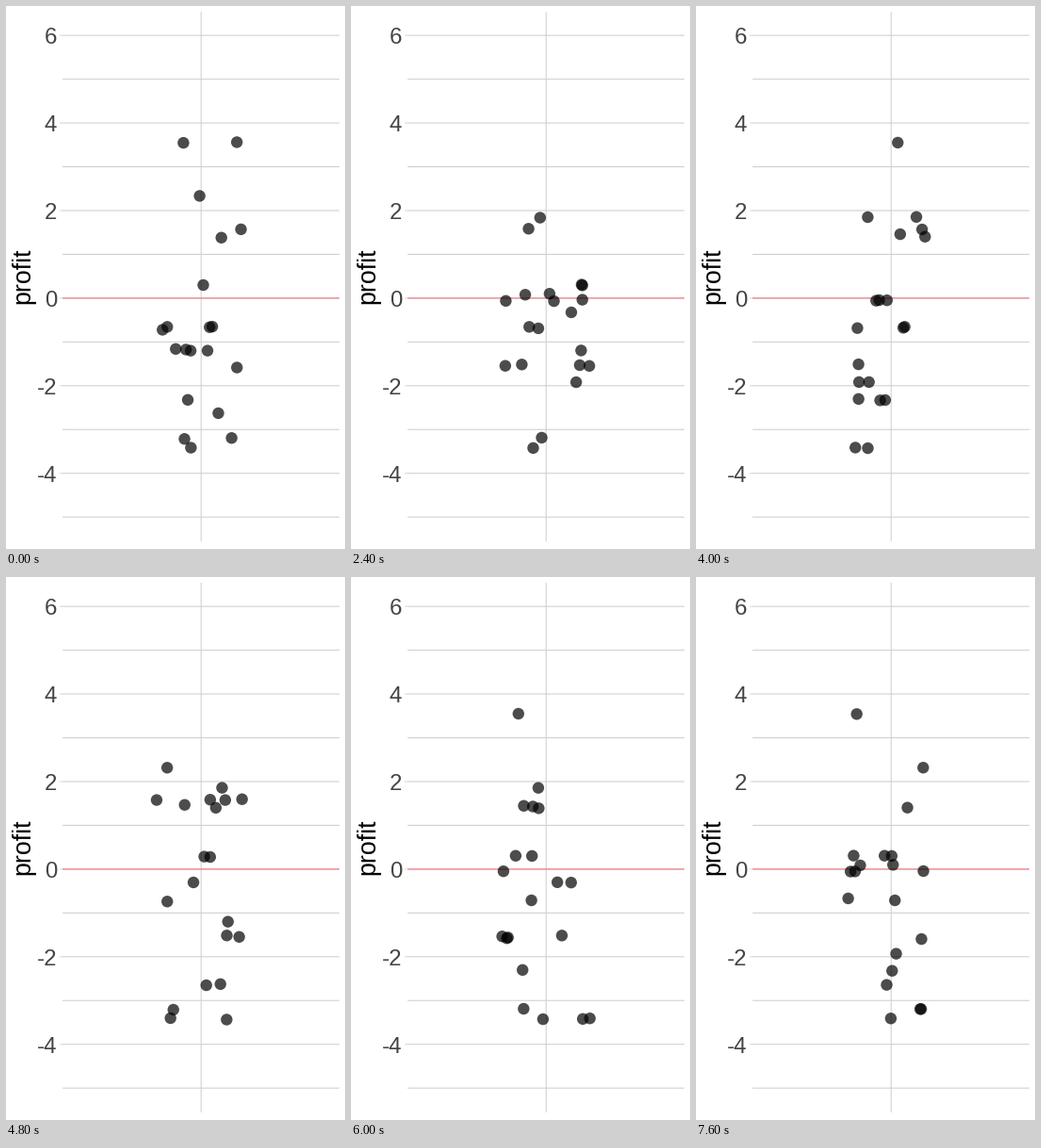
A matplotlib script for the animation above (8000 ms loop, 360x576 px).

```python
import matplotlib.pyplot as plt
import numpy as np
from matplotlib.animation import FuncAnimation

W, H, DPI = 360, 576, 100
FRAMES, INTERVAL = 20, 400
PT = 72 / DPI  # points per pixel
ZERO, UNIT = 309.9, 46.45  # pixel row of zero profit, pixels per unit
LEFT, RIGHT, TOP, BOTTOM = 60, 354, 6, 568
MIDDLE = (LEFT + RIGHT) / 2
SPREAD = 49  # widest sideways jitter of a dot
DOT = 12.4
FONT = "Liberation Sans"

PROFITS = np.array([3.56, 2.32, 1.84, 1.58, 1.45, 1.40, 0.29, 0.09, -0.05, -0.31,
                    -0.67, -0.73, -1.18, -1.53, -1.58, -1.93, -2.32, -2.64, -3.2, -3.42])
N = len(PROFITS)


def to_row(value):
    return ZERO - UNIT * value


def resample(seed):
    """Bootstrap the profits and jitter each dot."""
    rng = np.random.default_rng(seed)
    values = rng.choice(PROFITS, N) + rng.uniform(-0.02, 0.02, N)
    return np.column_stack([MIDDLE + rng.uniform(-SPREAD, SPREAD, N), to_row(values)])


fig = plt.figure(figsize=(W / DPI, H / DPI), dpi=DPI, facecolor="white")
ax = fig.add_axes([0, 0, 1, 1])
ax.set_xlim(0, W)
ax.set_ylim(H, 0)
ax.axis("off")


def rule(xs, ys, color):
    ax.plot(xs, ys, color=color, lw=1.07 * PT, solid_capstyle="butt", snap=False, zorder=1)


for value in range(-5, 7):
    row = to_row(value)
    rule([LEFT, RIGHT], [row, row], "#d0d0d0")
    if value % 2 == 0:
        rule([LEFT - 3, LEFT], [row, row], "#dadada")
        ax.text(54.3, row + 9, str(value), ha="right", va="baseline",
                fontsize=24 * PT, family=FONT, color="#444444")
rule([MIDDLE + 0.2] * 2, [TOP, BOTTOM], "#d0d0d0")
rule([LEFT, RIGHT], [ZERO, ZERO], "#f0757c")

ax.text(25.2, (TOP + BOTTOM) / 2 - 0.8, "profit", rotation=90, ha="center", va="baseline",
        rotation_mode="anchor", fontsize=26.8 * PT, family=FONT, color="black")

# One colour per dot keeps the dots at sub-pixel positions.
dots = ax.scatter(*resample(0).T, s=(DOT * PT) ** 2, color=[(0, 0, 0, 0.7)] * N,
                  linewidths=0, zorder=2)


def draw(i):
    dots.set_offsets(resample(i))
    return (dots,)


anim = FuncAnimation(fig, draw, frames=FRAMES, interval=INTERVAL, repeat=True,
                     repeat_delay=0, blit=False)
plt.show()
```
